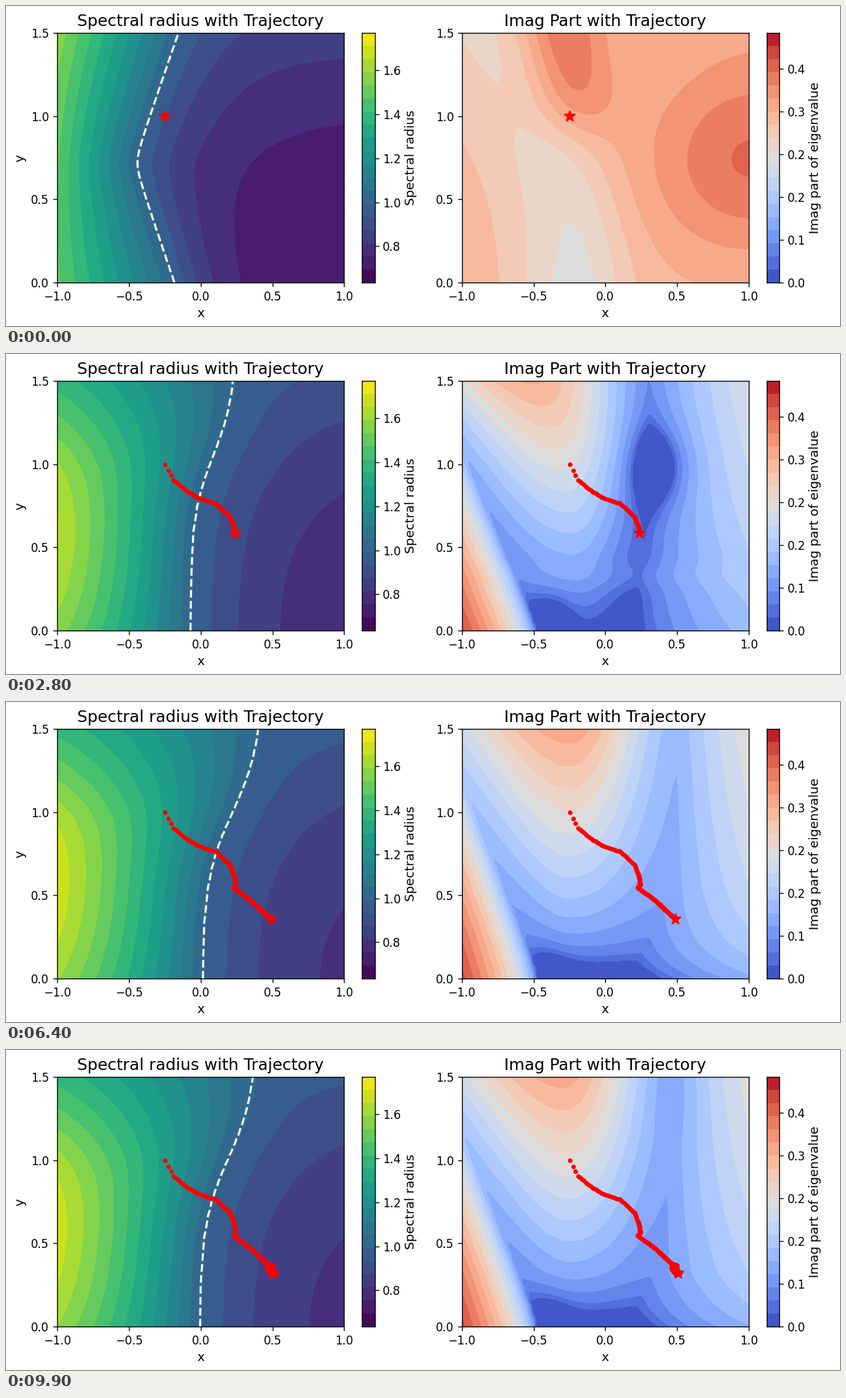
Write a matplotlib script that moves like this. It is 1207 px wide and 464 px high and loops after 10 s.

```python
import numpy as np
import matplotlib.pyplot as plt
from matplotlib.animation import FuncAnimation
from matplotlib.colors import Normalize

W, H, DPI = 1207, 464, 120
FRAMES, INTERVAL = 100, 100
BANDS = 19
UNIT = 6.11            # spectral radius 1.0, measured in colour bands
DOTS = 2               # trajectory dots per frame

plt.rcParams.update({"font.family": "DejaVu Sans", "font.size": 10})

xs = np.linspace(-1, 1, 81)
ys = np.linspace(0, 1.5, 81)
X, Y = np.meshgrid(xs, ys)


def mix(a, b, t):
    return a + (b - a) * t


def step(v):
    return 1 / (1 + np.exp(-v))


def bell(v, width):
    return np.exp(-(v / width) ** 2)


def two_sided_bell(v, left, right):
    return bell(v, np.where(v < 0, left, right))


def phase(frame):
    """How far the landscape has drifted to the right, and how much of the start is left."""
    drift = np.interp(frame, [18, 36, 47, 64, 76, 99], [1, 0, .17, 1, .4, .88])
    return drift, max(0, 1 - frame / 18)


def radius_field(drift, start):
    # x of the unit line, then the values on both side walls
    line = mix(-.14, .01, drift) + mix(.24, .42, drift) * step(
        (Y - mix(1.1, 1, drift)) / mix(.16, .2, drift))
    line = mix(line, -.47 + .4 * np.sqrt((Y - .72) ** 2 + .005), start)
    wall = 16.6 + 1.1 * drift - 4.2 * (Y - .62) ** 2 - (1 + .9 * drift) * step((Y - 1.1) / .12)
    wall = mix(wall, 14 + 1.4 * (Y - .4) ** 2, start)
    floor = mix(1.8 + drift, 1, start) + 1.1 * Y ** 2

    left = np.clip((line - X) / (1 + line), 0, 1)
    right = np.clip((X - line) / (1 - line), 0, 1)
    climb = left + mix(.28, 0, start) * left * (1 - left)
    rate = mix(2.1, 4, start)
    fall = (1 - np.exp(-rate * right)) / (1 - np.exp(-rate))
    return UNIT + (wall - UNIT) * climb + (floor - UNIT) * fall


def first_imag():
    base = 12.6 + .5 * X * (Y - .3)
    valley = (3.1 - 1.1 * Y) * two_sided_bell(X + .2 + .25 * Y ** 2, .45, .35)
    peak = 3.6 * step((Y - .95) / .1) * bell(X + .1 + .13 * Y, .3)
    hill = 3.3 * bell(X - 1, .7) * bell(Y - .72, .57)
    return base - valley + peak + hill


def later_imag(drift):
    """Root of a discriminant; where it is negative the eigenvalues are real."""
    center = mix(-.2 - .5 * (Y / 1.5) ** 3, -.25, drift)
    ridge = (10 * (1 - drift) + 80 * Y ** 1.8) * two_sided_bell(
        X - center, .6 - drift * (.5 - .4 * Y), mix(.15 + .15 * Y ** 2, .42, drift))
    wedge = np.maximum(0, 560 * (-.47 + .02 * drift - X) - (290 - 30 * drift) * Y)
    trough = .15 + .35 * drift * np.tanh(2 * Y)
    slope = (38 - 8 * drift + 30 * Y) * np.maximum(0, X - trough) / (1 - trough)

    hole = 25 * bell(X - .25 - .3 * drift, .25) * bell(Y - .55 - drift, .25)
    neck = 4 * bell(Y - .33, .08)
    floor = mix(neck - 4 - hole, 20 - 28 * np.exp(-Y / .3), drift ** 2)
    pocket = (18 - 11 * drift) * bell(X + .38, .16) * bell(Y, .2)
    return np.sqrt(np.maximum(0, ridge + wedge + slope + floor - pocket))


def trajectory():
    stops = np.array([
        [0, -.25, 1], [.5, -.225, .96], [1.5, -.19, .905], [5, -.1, .84],
        [9, -.01, .795], [13, .1, .765], [18, .203, .685], [24, .235, .61],
        [31, .243, .565], [34, .226, .547], [47, .353, .465], [64, .49, .355],
        [76, .467, .365], [99, .508, .32]])
    t = np.arange((FRAMES - 1) * DOTS + 1) / DOTS
    path = np.column_stack([np.interp(t, stops[:, 0], stops[:, i]) for i in (1, 2)])
    shake = np.random.default_rng(4).uniform(-1, 1, path.shape) * [.022, .013]
    loose = (t > 65) & ~np.isin(t, stops[:, 0])
    path[loose] += shake[loose]
    return path


path = trajectory()
opening = first_imag()
norm = Normalize(0, BANDS)
fig = plt.figure(figsize=(W / DPI, H / DPI), dpi=DPI, facecolor="white")


def add_axes(left, width, top=39.2, bottom=401):
    return fig.add_axes([left / W, 1 - bottom / H, width / W, (bottom - top) / H])


def add_panel(left, title):
    ax = add_axes(left, 415.2)
    ax.set(xlim=(-1, 1), ylim=(0, 1.5), xticks=np.arange(-1, 1.1, .5),
           yticks=np.arange(0, 1.6, .5))
    ax.set_title(title, fontsize=14)
    ax.set_xlabel("x", fontsize=11)
    dots, = ax.plot([], [], "ro", ms=4, mew=0, zorder=4)
    star, = ax.plot([], [], "r*", ms=10, zorder=5)
    return ax, dots, star


def add_bar(left, cmap, label, ticks, names):
    bar = add_axes(left, 18.1)
    bar.imshow(np.arange(.5, BANDS)[:, None], cmap=cmap, norm=norm, origin="lower",
               extent=(0, 1, 0, BANDS), aspect="auto", interpolation="nearest")
    bar.set_xticks([])
    bar.yaxis.tick_right()
    bar.yaxis.set_label_position("right")
    bar.set_yticks(ticks, names)
    bar.set_ylabel(label, fontsize=11, labelpad=3)


radius_panel = add_panel(74.2, "Spectral radius with Trajectory")
imag_panel = add_panel(659.8, "Imag Part with Trajectory")
radius_panel[0].set_ylabel("y", fontsize=11)
add_bar(515.4, "viridis", "Spectral radius", 2.76 + 3.355 * np.arange(5),
        ["0.8", "1.0", "1.2", "1.4", "1.6"])
add_bar(1100.9, "coolwarm", "Imag part of eigenvalue", 3.258 * np.arange(6),
        ["0.0", "0.1", "0.2", "0.2", "0.3", "0.4"])

layers = []


def fill(ax, z, cmap):
    z = np.clip(z, .01, BANDS - .01)
    layers.append(ax.contourf(xs, ys, z, np.arange(BANDS + 1), cmap=cmap, norm=norm))


def draw(frame):
    while layers:
        layers.pop().remove()
    drift, start = phase(frame)
    radius = radius_field(drift, start)
    fill(radius_panel[0], radius, "viridis")
    layers.append(radius_panel[0].contour(xs, ys, radius, [UNIT], colors="white",
                                          linestyles="--", linewidths=1.8))
    fill(imag_panel[0], mix(later_imag(drift), opening, start), "coolwarm")
    trail = path[:frame * DOTS + 1]
    for _, dots, star in (radius_panel, imag_panel):
        dots.set_data(trail[:, 0], trail[:, 1])
        star.set_data(trail[-1:, 0], trail[-1:, 1])
    return []


anim = FuncAnimation(fig, draw, frames=FRAMES, init_func=lambda: draw(0),
                     interval=INTERVAL, repeat=True, repeat_delay=0, blit=False)
plt.show()
```
